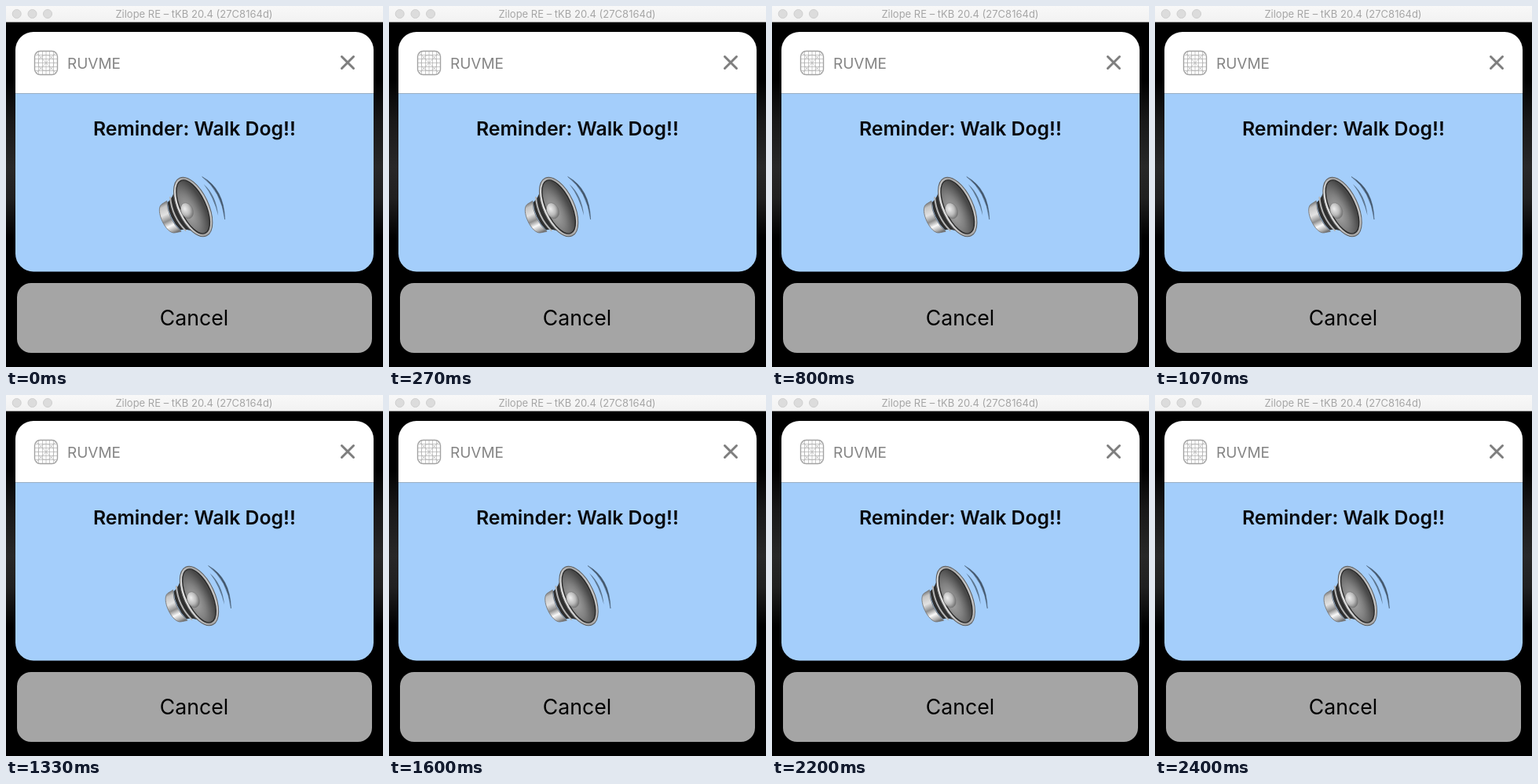
An HTML page that plays this animation: 480 by 460 pixels, repeating every 2.47 s.

```html
<!DOCTYPE html>
<html lang="en">
<head>
<meta charset="utf-8">
<title>Reminder</title>
<style>
  html, body { margin: 0; width: 100%; height: 100%; overflow: hidden; background: #000; }
  svg { display: block; width: 480px; height: 460px; font-family: Inter, "Open Sans", sans-serif; }
  text { text-anchor: middle; }
</style>
</head>
<body>
<svg viewBox="0 0 480 460">
  <defs>
    <linearGradient id="bar" x2="0" y2="1">
      <stop stop-color="#f8f8f8"/><stop offset="1" stop-color="#f2f2f2"/>
    </linearGradient>
    <linearGradient id="glow" x2="0" y2="1">
      <stop/><stop offset=".25" stop-color="#181818"/><stop offset=".55" stop-color="#282828"/>
      <stop offset=".75" stop-color="#202020"/><stop offset="1"/>
    </linearGradient>
    <linearGradient id="magnet" x2="0" y2="1">
      <stop stop-color="#777"/><stop offset=".12" stop-color="#c4c4c4"/>
      <stop offset=".35" stop-color="#e2e2e2"/><stop offset=".55" stop-color="#8e8e8e"/>
      <stop offset=".72" stop-color="#fafafa"/><stop offset=".88" stop-color="#aaa"/><stop offset="1" stop-color="#555"/>
    </linearGradient>
    <linearGradient id="rim" y2=".2">
      <stop stop-color="#f0f0f0"/><stop offset=".6" stop-color="#a0a0a0"/><stop offset="1" stop-color="#c4c4c4"/>
    </linearGradient>
    <radialGradient id="cone" cx=".25" cy=".55" r=".65">
      <stop stop-color="#aaa"/><stop offset=".5" stop-color="#808080"/><stop offset="1" stop-color="#484848"/>
    </radialGradient>
    <radialGradient id="cap" cx=".4" cy=".35" r=".65">
      <stop stop-color="#eee"/><stop offset=".6" stop-color="#bbb"/><stop offset="1" stop-color="#777"/>
    </radialGradient>
    <clipPath id="card"><rect x="12" y="33" width="456" height="305.6" rx="23"/></clipPath>
  </defs>

  <rect width="480" height="460"/>
  <rect y="95" width="480" height="200" fill="url(#glow)"/>

  <rect width="480" height="20.6" fill="url(#bar)"/>
  <g fill="#dcdcdc" stroke="#d0d0d0">
    <circle cx="13.7" cy="10" r="5.5"/><circle cx="33.5" cy="10" r="5.5"/><circle cx="53" cy="10" r="5.5"/>
  </g>
  <text x="239.5" y="15" font-size="13" fill="#a6a6a6">Zilope RE – tKB 20.4 (27C8164d)</text>

  <g clip-path="url(#card)">
    <rect x="12" y="33" width="456" height="78" fill="#fff"/>
    <rect x="12" y="111" width="456" height="228" fill="#a4cefb"/>
    <rect x="12" y="111" width="456" height="1" fill="#9aafc4"/>
  </g>

  <g fill="none" stroke="#b0b0b0">
    <rect x="36.5" y="57.5" width="29" height="30" rx="7" stroke="#a2a2a2" stroke-width="1.4"/>
    <path d="M41.5 58V87M46.5 58V87M55.5 58V87M60.5 58V87M37 62.5H65M37 67.5H65M37 77.5H65M37 82.5H65M51 58V87M37 72.5H65M38.5 59.5L63.5 85.5M63.5 59.5L38.5 85.5" stroke-width=".7"/>
    <circle cx="51" cy="72.5" r="10" stroke-width=".7"/>
  </g>
  <text x="112" y="79.5" font-size="19" fill="#858585">RUVME</text>
  <path d="M427.5 64.5L442.5 79.5M442.5 64.5L427.5 79.5" stroke="#7e7e7e" stroke-width="3" stroke-linecap="round"/>

  <text x="240" y="165" font-size="24.8" font-weight="600" fill="#08090c">Reminder: Walk Dog!!</text>

  <g id="speaker">
    <g transform="translate(238.5 256) rotate(-25)">
      <path d="M-27-21L-35-20C-46-17-46 17-35 20L-27 22Q-36 0-27-21Z" fill="url(#magnet)" stroke="#777" stroke-width=".8"/>
      <path d="M-27-19Q-20-20-8-33V33Q-20 20-27 20Q-34 0-27-19Z" fill="#303030"/>
      <path d="M-21-24Q-30 0-21 24" fill="none" stroke="#b5b5b5" stroke-width="2"/>
      <ellipse rx="19.6" ry="40.6" fill="url(#rim)" stroke="#5c5c5c"/>
      <ellipse rx="16" ry="36.8" fill="url(#cone)" stroke="#292929" stroke-width="1.4"/>
      <ellipse cx="-9" cy="1" rx="7.5" ry="10.5" fill="url(#cap)" stroke="#777" stroke-width=".6"/>
    </g>
    <path d="M250 217.5Q278 233 279 272Q274.5 236 250 217.5Z" fill="#43566b" stroke="#43566b" stroke-width=".5"/>
    <path d="M252 227Q268 241 270.5 267Q264.5 243 252 227Z" fill="#5c7690"/>
  </g>

  <rect x="14" y="353" width="452" height="89" rx="18" fill="#a5a5a5"/>
  <text x="239.5" y="407" font-size="26.7">Cancel</text>
</svg>
<script>
  const LOOP = 2470, FPS = 15, SHAKE = 1000, REACH = 28;
  const swings = [-1, 1, -1, 1, -.65, .35, -.25, .25, 0];
  const speaker = document.getElementById('speaker');

  // Damped zigzag, linear between swings, restarting every second.
  function shakeX(ms) {
    const pos = (ms + SHAKE - 3) % SHAKE / SHAKE * (swings.length - 1);
    const i = Math.floor(pos);
    return REACH * (swings[i] + (swings[i + 1] - swings[i]) * (pos - i)) - .5;
  }

  function draw(now) {
    const t = now % LOOP;
    const step = Math.min(36, Math.floor((t + 4) * FPS / 1000));
    speaker.setAttribute('transform', `translate(${shakeX(step * 1000 / FPS).toFixed(2)} 0)`);
    requestAnimationFrame(draw);
  }
  draw(performance.now());
</script>
</body>
</html>
```
